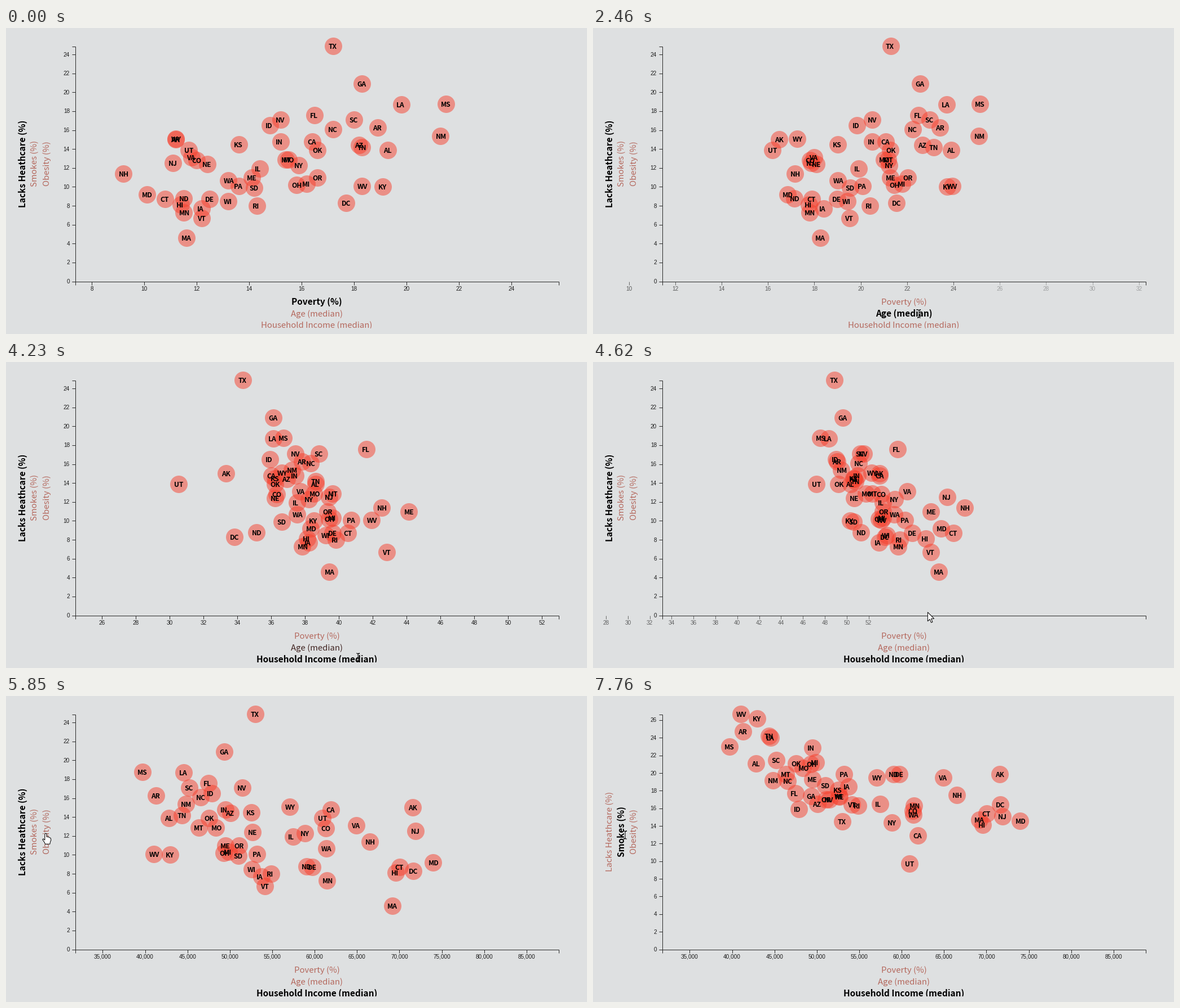
A matplotlib script for the animation above (7.99 s loop, 1030 px wide and 544 px high).

```python
import numpy as np
import matplotlib.pyplot as plt
from matplotlib.animation import FuncAnimation
from matplotlib.patches import Polygon, Rectangle

W, H, DPI = 1030, 544, 100
STEP, FRAMES = 47, 170                      # 7990 ms per loop
LEFT, RIGHT, TOP, BASE = 122.5, 979.5, 32, 450.5
BG, INK, LINE = "#dee0e1", np.zeros(3), "#2b2b2b"
FADED = np.array([0.71, 0.41, 0.37])
SANS, TICK_FONT = "Noto Sans CJK JP", "Liberation Sans"

STATES = ("AL AK AZ AR CA CO CT DE DC FL GA HI ID IL IN IA KS KY LA ME MD MA MI "
          "MN MS MO MT NE NV NH NJ NM NY NC ND OH OK OR PA RI SC SD TN TX UT VT "
          "VA WA WV WI WY").split()
poverty = [19.3, 11.2, 18.2, 18.9, 16.4, 12, 10.8, 12.5, 17.7, 16.5, 18.3, 11.4,
           14.8, 14.4, 15.2, 12.2, 13.6, 19.1, 19.8, 14.1, 10.1, 11.6, 16.2, 11.5,
           21.5, 15.5, 15.4, 12.4, 15.2, 9.2, 11.1, 21.3, 15.9, 17.2, 11.5, 15.8,
           16.6, 16.6, 13.6, 14.3, 18, 14.2, 18.3, 17.2, 11.7, 12.2, 11.8, 13.2,
           18.3, 13.2, 11.2]
age = [38.6, 33.3, 36.9, 37.8, 36, 36.3, 40.5, 39.6, 33.8, 41.6, 36.1, 38.1,
       35.9, 37.5, 37.4, 38.2, 36.2, 38.5, 36.1, 44.1, 38.3, 39.4, 39.6, 37.8,
       36.7, 38.5, 39.6, 36.2, 37.4, 42.5, 39.4, 37.2, 38.2, 38.3, 35.1, 39.4,
       36.2, 39.3, 40.7, 39.8, 38.8, 36.6, 38.6, 34.3, 30.5, 42.8, 37.7, 37.5,
       41.9, 39.2, 36.6]
income = [42830, 71583, 50068, 41262, 61933, 61303, 70048, 59716, 71648, 47463,
          49321, 69592, 47861, 57444, 49446, 53712, 52504, 42958, 44555, 49462,
          73971, 69160, 49847, 61481, 39680, 48363, 46328, 52686, 51450, 66532,
          71919, 44803, 58878, 46556, 59029, 49308, 47529, 51075, 53234, 54891,
          45238, 50979, 44361, 53035, 60922, 54166, 64902, 61366, 41059, 52622,
          57055]
healthcare = [13.9, 15, 14.4, 16.3, 14.8, 12.8, 8.7, 8.7, 8.3, 17.6, 20.9, 8.1,
              16.5, 11.9, 14.8, 7.7, 14.5, 10, 18.7, 11, 9.2, 4.6, 10.3, 7.3,
              18.8, 12.9, 12.9, 12.4, 17.1, 11.4, 12.5, 15.4, 12.3, 16.1, 8.8, 10.2,
              13.9, 11, 10.1, 8, 17.1, 9.9, 14.2, 24.9, 13.9, 6.7, 13.1, 10.7,
              10.1, 8.5, 15.1]
smokes = [21.1, 19.9, 16.5, 24.7, 12.9, 15.7, 15.4, 19.9, 16.4, 17.7, 17.4, 14.1,
          15.9, 16.5, 22.9, 18.5, 18.1, 26.2, 24, 19.3, 14.6, 14.7, 21.2, 16.3,
          23, 20.6, 19.9, 17.3, 17, 17.5, 15.1, 19.2, 14.4, 19.1, 19.9, 21,
          21.1, 17, 19.9, 16.3, 21.5, 18.6, 24.2, 14.5, 9.7, 16.4, 19.5, 15.3,
          26.7, 17.4, 19.5]


def px(n):
    return n * 72 / DPI


def ease(t):
    t = min(max(t, 0), 1)
    return 4 * t**3 if t < 0.5 else 1 - 4 * (1 - t)**3


class Scale:
    """Linear map from data to stage pixels, with its tick values."""

    def __init__(self, data, lo, hi, start, end, ticks):
        self.data, self.ticks = np.array(data, float), list(ticks)
        self.lo, self.start, self.k = lo, start, (end - start) / (hi - lo)

    def __call__(self, v):
        return self.start + self.k * (v - self.lo)


def x_scale(data, ticks):
    return Scale(data, 0.8 * min(data), 1.2 * max(data), LEFT, RIGHT, ticks)


def y_scale(data, ticks):
    return Scale(data, 0, max(data), BASE, TOP, ticks)


X = [x_scale(poverty, range(8, 25, 2)), x_scale(age, range(26, 53, 2)),
     x_scale(income, range(35000, 85001, 5000))]
Y = [y_scale(healthcare, range(0, 25, 2)), y_scale(smokes, range(0, 27, 2))]
X_CHANGES, Y_CHANGES = [2030, 4180], [6700]


def blend(scales, changes, t):
    """Scales before and after the current change, and its eased progress."""
    n = sum(t >= c for c in changes)
    if n == 0:
        return scales[0], scales[0], 1
    return scales[n - 1], scales[n], ease((t - changes[n - 1]) / 1000)


def lerp(a, b, p):
    return a + (b - a) * p


fig = plt.figure(figsize=(W / DPI, H / DPI), dpi=DPI, facecolor=BG)
ax = fig.add_axes([0, 0, 1, 1])
ax.set(xlim=(0, W), ylim=(H, 0))
ax.axis("off")


def stroke(xs, ys, z=1, color=LINE):
    return ax.plot(xs, ys, color=color, lw=px(1), zorder=z,
                   solid_capstyle="butt", solid_joinstyle="miter")[0]


stroke([LEFT, LEFT, RIGHT, RIGHT], [BASE + 6, BASE, BASE, BASE + 6])
stroke([LEFT - 6, LEFT, LEFT, LEFT - 6], [BASE, BASE, TOP + .5, TOP + .5])


class Tick:
    def __init__(self, value, horizontal):
        self.value, self.horizontal = value, horizontal
        self.line = stroke([0, 0], [0, 0])
        self.text = ax.text(0, 0, f"{value:,}", family=TICK_FONT, size=px(10),
                            color="#1c1c1c", va="baseline",
                            ha="center" if horizontal else "right")

    def update(self, a, b, p):
        was, stays = self.value in a.ticks, self.value in b.ticks
        alpha = 1 if was and stays else p if stays else 1 - p if was else 0
        pos = lerp(a(self.value), b(self.value), p)
        shown = alpha > 0.01 and -30 < pos < W + 30
        for part in (self.line, self.text):
            part.set_visible(shown)
            part.set_alpha(alpha)
        if not shown:
            return
        if self.horizontal:
            self.line.set_data([pos, pos], [BASE, BASE + 6])
            self.text.set_position((pos, BASE + 16.5))
        else:
            self.line.set_data([LEFT - 6, LEFT], [pos, pos])
            self.text.set_position((LEFT - 9.5, pos + 3.5))


x_ticks = [Tick(v, True) for v in sorted({v for s in X for v in s.ticks})]
y_ticks = [Tick(v, False) for v in sorted({v for s in Y for v in s.ticks})]

dots = ax.scatter(X[0](X[0].data), Y[0](Y[0].data), s=px(31)**2, color="#f63f2c",
                  alpha=0.5, linewidths=0, zorder=3)
names = [ax.text(0, 0, s, family=SANS, weight="bold", size=px(12), color="black",
                 va="baseline", zorder=4) for s in STATES]


class Title:
    """Axis title: bold while active, dark while hovered."""

    def __init__(self, label, x, y, active, dark, angle=0):
        self.active, self.dark = active, dark
        self.text = ax.text(x, y, label, family=SANS, ha="center", va="baseline",
                            rotation=angle, rotation_mode="anchor", zorder=2)

    def update(self, t):
        bold = self.active[0] <= t < self.active[1]
        shade = 0.0
        for start, goal in self.dark:
            shade = lerp(shade, goal, min(max((t - start) / 300, 0), 1))
        self.text.set_color(INK if bold else lerp(FADED, INK, shade))
        self.text.set_fontweight("bold" if bold else "light")
        self.text.set_fontsize(px(15.4 if bold else 14.9))


MID_X, MID_Y, END = (LEFT + RIGHT) / 2, 241, 9999
titles = [
    Title("Poverty (%)", MID_X, 492, (0, 1990), [(-500, 1), (1990, 0)]),
    Title("Age (median)", MID_X, 513, (1990, 4140), [(1440, 1), (4140, 0)]),
    Title("Household Income (median)", MID_X, 533.5, (4140, END), [(3500, 1)]),
    Title("Lacks Heathcare (%)", 34.5, MID_Y, (0, 6640), [(-500, 1), (6640, 0)], 90),
    Title("Smokes (%)", 55.5, MID_Y, (6640, END), [(6110, 1)], 90),
    Title("Obesity (%)", 76.5, MID_Y, (END, END), [(5840, 1), (6080, 0)], 90),
]
ax.add_patch(Rectangle((0, 534), W, 10, fc=BG, ec="none", zorder=2.5))

ARROW = np.array([(0, 0), (0, 16), (3.7, 12.6), (6.2, 18.4), (8.6, 17.4),
                  (6.2, 11.6), (11.3, 11.4)])
HAND = np.array([(-1.6, 1), (0, 0), (1.6, 1), (1.6, 6), (4, 6.2), (6.5, 7.2),
                 (8.8, 8.6), (9.4, 12), (8, 15.5), (7.4, 19), (-1, 19),
                 (-2.2, 16), (-5.6, 11.2), (-4.4, 9.6), (-1.6, 12)])
BEAM = np.array([(-3, -7), (-1, -7), (0, -6), (1, -7), (3, -7), (0, -6), (0, 6),
                 (-3, 7), (-1, 7), (0, 6), (1, 7), (3, 7)])


def pointer(shape):
    return ax.add_patch(Polygon(shape, fc="white", ec="black", lw=px(1), zorder=6))


arrow, hand = pointer(ARROW), pointer(HAND)
beam = stroke([], [], z=6, color="black")
PATH_T = [520, 900, 1300, 1390, 1620, 3320, 3650, 4000, 4300, 4800, 5000, 5400,
          5790, 5850, 6050, 6410]
PATH_X = [899, 745, 598, 598, 578, 578, 604, 624, 624, 577, 577, 300,
          83, 70, 68, 57]
PATH_Y = [409, 440, 487, 487, 508, 508, 519, 525, 525, 402, 402, 320,
          250, 244, 246, 247]
# When each pointer shape takes over
POINTERS = [(0, None), (520, arrow), (1440, hand), (1990, beam), (3420, hand),
            (4140, beam), (4380, arrow), (5830, hand), (6640, beam)]


def move_pointer(t):
    current = [kind for start, kind in POINTERS if t >= start][-1]
    spot = np.array([np.interp(t, PATH_T, PATH_X), np.interp(t, PATH_T, PATH_Y)])
    for kind in (arrow, hand, beam):
        kind.set_visible(kind is current)
    arrow.set_xy(ARROW + spot)
    hand.set_xy(HAND + spot)
    beam.set_data(*(BEAM + spot).T)


def draw(i):
    t = i * STEP + 20
    xa, xb, xp = blend(X, X_CHANGES, t)
    ya, yb, yp = blend(Y, Y_CHANGES, t)
    xs = lerp(xa(xa.data), xb(xb.data), xp)
    ys = lerp(ya(ya.data), yb(yb.data), yp)
    dots.set_offsets(np.column_stack([xs, ys]))
    for name, x, y in zip(names, xs, ys):
        name.set_position((x - 8.5, y + 5))
    for tick in x_ticks:
        tick.update(xa, xb, xp)
    for tick in y_ticks:
        tick.update(ya, yb, yp)
    for title in titles:
        title.update(t)
    move_pointer(t)
    return []


anim = FuncAnimation(fig, draw, frames=FRAMES, interval=STEP, init_func=lambda: [],
                     repeat=True, cache_frame_data=False)
plt.show()
```
